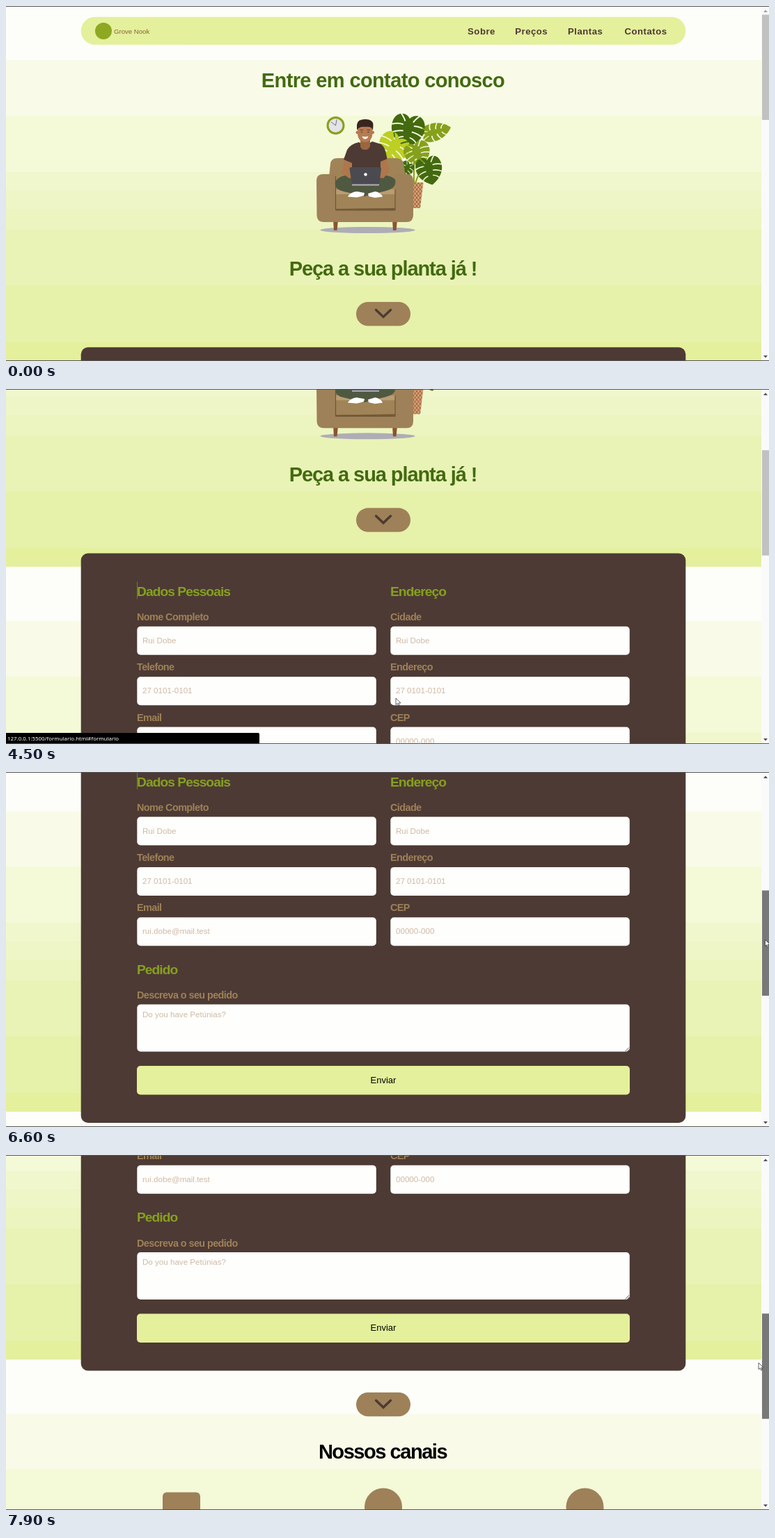
An HTML page that plays this animation: 1096 px wide and 511 px high, repeating every 8000 ms.

```html
<!DOCTYPE html>
<html lang="pt">
<head>
<meta charset="utf-8">
<title>Contato</title>
<style>
html, body { margin: 0; width: 100%; height: 100%; overflow: hidden; background: #fff; }
svg { display: block; width: 1096px; height: 511px; }
text { font-family: "Liberation Sans", Arial, sans-serif; }
.h1 { font-size: 29px; font-weight: bold; text-anchor: middle; fill: #436a10; }
.h2 { font-size: 19.2px; font-weight: bold; letter-spacing: -.049em; fill: #86a01d; }
.label { font-size: 14.4px; font-weight: bold; letter-spacing: -.04em; fill: #9e8158; }
.hint { font-size: 11.6px; fill: #cfb9a6; }
.send { font-size: 13px; text-anchor: middle; }
.nav { font-size: 13.2px; font-weight: bold; letter-spacing: .5px; text-anchor: middle; fill: #4d3a34; }
.brand { font-size: 9.6px; fill: #8a6234; }
.url { font-family: "Noto Sans", sans-serif; font-size: 7.9px; fill: #fff; }
</style>
</head>
<body>
<svg viewBox="0 0 1096 511">
  <defs>
    <mask id="slits" maskUnits="userSpaceOnUse" x="-60" y="-60" width="120" height="120">
      <rect x="-60" y="-60" width="120" height="120" fill="#fff"/>
      <path d="M-56-8Q-34-18-16-15M-52 16Q-32 4-13 3M-38 40Q-26 22-9 20M-36-52Q-20-40-12-25M56-8Q34-18 16-15M52 16Q32 4 13 3M38 40Q26 22 9 20M36-52Q20-40 12-25" fill="none" stroke="#000" stroke-width="4"/>
    </mask>
    <path id="leaf" mask="url(#slits)" d="M0-34C-14-54-50-48-50-8C-48 24-20 42 0 52C20 42 48 24 50-8C50-48 14-54 0-34Z"/>
    <pattern id="weave" width="5" height="6" patternUnits="userSpaceOnUse">
      <rect width="5" height="6" fill="#d9a273"/>
      <path d="M0 0L5 6M5 0L0 6" stroke="#8f5535" stroke-width=".9"/>
    </pattern>
  </defs>

  <g id="page">
    <g id="bands"></g>
    <rect x="107.700" y="15.800" width="868.600" height="40" rx="20" fill="#e4f09b"/>
    <circle cx="140" cy="36" r="12" fill="#8fa821"/>
    <text class="brand" x="155" y="40">Grove Nook</text>
    <g id="nav"></g>
    <text class="h1" x="541.5" y="117" letter-spacing="-.62">Entre em contato conosco</text>

    <g id="art">
      <ellipse cx="519.5" cy="322.5" rx="68" ry="4.5" fill="#aeadb5"/>
      <path d="M583 254H599.500L595 291H583Z" fill="url(#weave)"/>
      <path d="M586 256V222Q588 205 579 190M588 255Q592 240 604 228" fill="none" stroke="#86a01d" stroke-width="2"/>
      <g id="leaves"></g>
      <path d="M470 308H477L475.500 323H471ZM555 308H562L560.500 323H556Z" fill="#8a5430"/>
      <path d="M464 246L466 227Q467 219 476 219H560Q570 219 571 227L574 246V295H464Z" fill="#a08457"/>
      <path d="M446 251Q446 242 456 242H474V292H559V242H576Q585 242 585 251V301Q585 311 575 311H457Q447 311 446.500 302Z" fill="#9e8158"/>
      <path d="M474 264H559V271H474Z" fill="#b99d72"/>
      <path d="M473.500 245V293.500H559V264" fill="none" stroke="#6f5538" stroke-width="1.2"/>
      <path d="M474 292L559 291V294.500H474Z" fill="#735839"/>
      <!-- figure -->
      <path d="M500 243Q479 242 473 253Q471 264 485 267L515 274L546 266Q562 262 559 250Q554 243 533 243Z" fill="#4f5941"/>
      <path d="M491 274.500Q494 268 504 267L515 269L514 273L504 275.500ZM541 274.500Q538 268 530 267L520 270L521 274L530 276Z" fill="#fff"/>
      <path d="M487 219L498 224L493 236L499 247L493 248L482 240ZM546 217L537 223L541 235L536 247L542 248L551 238Z" fill="#b0764c"/>
      <path d="M507 196Q494 199 490 207L485 221L497 226V241H538V224L547.500 220Q545 203 539 199L526 195Q516 202 507 196Z" fill="#4d3a34"/>
      <path d="M509 188H523V202Q521 207 516 207Q510 207 509 202Z" fill="#9c653f"/>
      <circle cx="504.500" cy="182" r="2" fill="#a9704a"/>
      <circle cx="527" cy="182" r="2" fill="#a9704a"/>
      <path d="M505 171H526.500V184Q525 196 516 196Q506 196 505 184Z" fill="#b67b51"/>
      <path d="M504 179V171Q505 163 516 163Q527 163 527.500 171L527 179Q526 173 516 174Q506 173 504 179Z" fill="#38251f"/>
      <path d="M508.500 178.500H513M518.500 178.500H523M509.500 181.500H512.500M519 181.500H522" stroke="#4a2f22" stroke-width=".8"/>
      <path d="M511.500 187.500Q516 189 520.500 187.500Q519 191.500 516 191.500Q512.500 191.500 511.500 187.500Z" fill="#fff"/>
      <path d="M496 232H537Q539.500 232 539 234.500L536 257H497L493.500 234.500Q493.500 232 496 232Z" fill="#4a4a50"/>
      <circle cx="516.500" cy="242.500" r="2.200" fill="#fff"/>
      <rect x="497" y="256.500" width="39" height="2" fill="#b2b1ba"/>
      <circle cx="473.500" cy="172" r="11.500" fill="#e4e3e8" stroke="#86a01d" stroke-width="3"/>
      <path d="M467 167L473.500 172L475 163.500" fill="none" stroke="#55555c" stroke-width=".8"/>
    </g>

    <text class="h1" x="541.5" y="388" letter-spacing="-1.08">Peça a sua planta já !</text>
    <rect x="107.700" y="491.200" width="868.600" height="545.800" rx="10" fill="#4d3a34"/>
    <g id="form"></g>
    <path d="M889.500 934L895 928.500M892.500 934L895 931.500" stroke="#555"/>
    <rect x="188" y="955" width="708" height="41.500" rx="5" fill="#e4f09b"/>
    <text class="send" x="542" y="979.500">Enviar</text>
    <g id="arrows"></g>
    <text class="h1" x="541" y="1163.500" letter-spacing="-1.45" style="fill:#000">Nossos canais</text>
    <g fill="#9e8158">
      <rect x="225" y="1212" width="54" height="42" rx="6"/>
      <circle cx="542" cy="1233" r="27"/>
      <circle cx="831.500" cy="1233" r="27"/>
    </g>
    <path id="caret" d="M188.500 532V557" stroke="#5c8a12"/>
  </g>

  <g id="status">
    <path id="bar"/>
    <text id="url" class="url" x="2" y="506"></text>
  </g>
  <rect x="1085" width="11" height="511" fill="#fafafa"/>
  <rect id="thumb" x="1086" width="10" height="151.500"/>
  <path id="up" d="M1088 9L1091 5.500L1094 9Z"/>
  <path d="M1088 503L1091 506.500L1094 503Z" fill="#505050"/>
  <path d="M0 .5H1096M0 510.500H1096" stroke="#555"/>
  <g id="cursor" fill="#fff" stroke="#222" stroke-width=".7" stroke-linejoin="round">
    <path id="arrow" d="M0 0V9.500L2.200 7.500L3.700 11L5.300 10.300L3.800 7H7Z"/>
    <path id="hand" d="M-1 1Q0-.5 1 1V4.500L4.500 5.500Q5.500 6 5.300 7.500L4.300 11.500H-1L-3.700 7.500Q-3.500 6-2.300 6.500L-1 7.500Z"/>
  </g>
</svg>
<script>
const $ = id => document.getElementById(id);
const clamp = v => Math.max(0, Math.min(1, v));
const text = (cls, x, y, s) => `<text class="${cls}" x="${x}" y="${y}">${s}</text>`;
const box = (x, y, w, h) => `<rect x="${x}" y="${y}" width="${w}" height="${h}" rx="5" fill="#fefefc"/>`;

// The background repeats once per screen height
const period = 510.5;
const bands = [[0, '#fdfefa'], [78, '#f9fbe8'], [158, '#f4f9d8'], [239, '#f0f7cd'], [265, '#eef6c8'],
  [292, '#ecf5c0'], [322, '#e9f3b6'], [402, '#e6f1a9'], [484, '#e4f09c']];
for (let p = 0; p < 3; p++)
  $('bands').innerHTML += bands.map(([y, c]) =>
    `<rect y="${p * period + y}" width="1085" height="${period - y}" fill="${c}"/>`).join('');

// Label, centre, hover start, hover end
const links = [['Sobre', 683, 1000, 1200], ['Preços', 754.7, 1200, 1600],
  ['Plantas', 832.2, 1600, 2000], ['Contatos', 919, 2000, 2250]];
$('nav').innerHTML = links.map(l => text('nav', 0, 4.5, l[0])).join('');

// x, y, turn, width, height, colour
$('leaves').innerHTML = [
  [617, 181, -106, 26, 44, '#86a01d'], [577, 179, 10, 48, 50, '#436a10'],
  [556, 204, 35, 46, 44, '#bccf22'], [575, 235, 30, 20, 25, '#436a10'],
  [591, 212, -20, 38, 36, '#86a01d'], [608, 236, -12, 38, 42, '#436a10']
].map(([x, y, r, w, h, c]) =>
  `<use href="#leaf" fill="${c}" transform="translate(${x} ${y}) rotate(${r}) scale(${w / 100} ${h / 100})"/>`).join('');

const column = (x, title, fields) => text('h2', x, 552.5, title) + fields.map(([label, hint], i) => {
  const y = 596.5 + i * 72.4;
  return text('label', x, y - 9, label) + box(x + .3, y, 343.5, 41) + text('hint', x + 8, y + 24, hint);
}).join('');
const person = 'Rui Dobe', phone = '27 0101-0101';
$('form').innerHTML =
  column(188, 'Dados Pessoais', [['Nome Completo', person], ['Telefone', phone], ['Email', 'rui.dobe@mail.test']]) +
  column(552, 'Endereço', [['Cidade', person], ['Endereço', phone], ['CEP', '00000-000']]) +
  text('h2', 188, 822.5, 'Pedido') + text('label', 188, 858, 'Descreva o seu pedido') +
  box(188.3, 866.5, 707.5, 68) + text('hint', 196, 884.5, 'Do you have Petúnias?');

$('arrows').innerHTML = [426, 1068.3].map(y => `<g transform="translate(503 ${y})">
  <rect width="78" height="34.500" rx="17.200" fill="#9e8158"/>
  <path d="M28.500 11.500L39 21.500L49.500 11.500" fill="none" stroke="#4d3a34" stroke-width="3.400" stroke-linecap="round"/></g>`).join('');

// Linear interpolation over rows of [time, ...values]
function at(keys, t) {
  let i = 1;
  while (i < keys.length - 1 && keys[i][0] < t) i++;
  const a = keys[i - 1], b = keys[i], u = clamp((t - a[0]) / (b[0] - a[0]));
  return a.slice(1).map((v, k) => v + (b[k + 1] - v) * u);
}
const formTop = 490.5;
const drag = [[6200, formTop], [6600, 532], [7000, 605], [7100, 605], [7400, 663], [7900, 726.5]];
const path = [[400, 146, 262], [600, 290, 140], [800, 450, 42], [1000, 600, 12], [1200, 683, 34],
  [1300, 722, 28], [1400, 752, 36], [1500, 752, 36], [1900, 830, 38], [2200, 915, 36], [2400, 930, 52],
  [2700, 790, 230], [3100, 558, 445], [3200, 558, 445], [3300, 560, 445], [4500, 560, 445],
  [4900, 760, 366], [5300, 760, 366], [6100, 1091, 229], [7000, 1090, 229], [7400, 1085, 229], [7900, 1081, 229]];

function scrollAt(t) {
  if (t > 6200) return at(drag, t)[0];
  const u = clamp((t - 4200) / 585);
  return formTop * u * u * (3 - 2 * u);
}

function setStatus(t) {
  const onNav = t >= 1700 && t < 2500, onButton = t >= 3100 && t < 4900;
  $('status').style.display = onNav || onButton ? '' : 'none';
  const w = onNav ? 130 : t < 4300 ? 168 : 364;
  $('bar').setAttribute('d', `M0 495H${w - 2}Q${w} 495 ${w} 497V511H0Z`);
  $('url').textContent = '127.0.0.1:5500/formulario.html#' + (onNav ? '' : 'formulario');
}

function draw(now) {
  const t = Math.floor(now % 8000 / 100) * 100;
  const scroll = scrollAt(t), shift = scroll * .297;
  $('page').setAttribute('transform', `translate(0 ${-scroll})`);
  $('thumb').setAttribute('y', 12.5 + shift);
  $('thumb').setAttribute('fill', t >= 6200 ? '#787878' : t >= 6000 ? '#a8a8a8' : '#c1c1c1');
  $('up').setAttribute('fill', scroll ? '#505050' : '#a3a3a3');
  $('caret').style.display = t >= 4400 && (t - 4400) % 1000 < 500 ? '' : 'none';

  links.forEach(([, x, from, to], i) => {
    const k = 1 + .33 * (clamp((t - from) / 200) - clamp((t - to) / 200));
    $('nav').children[i].setAttribute('transform', `translate(${x} 36.500) scale(${k})`);
  });

  const [x, y] = at(path, t);
  const dy = t > 6200 ? (scroll - formTop) * .297 : 0;
  const hand = t >= 1100 && t < 2400 || t >= 3300 && t < 4400;
  $('cursor').setAttribute('transform', `translate(${x} ${y + dy})`);
  $('cursor').style.display = t < 400 ? 'none' : '';
  $('hand').style.display = hand ? '' : 'none';
  $('arrow').style.display = hand ? 'none' : '';
  setStatus(t);
}

const start = performance.now();
function tick() {
  draw(performance.now() - start);
  requestAnimationFrame(tick);
}
tick();
</script>
</body>
</html>
```
